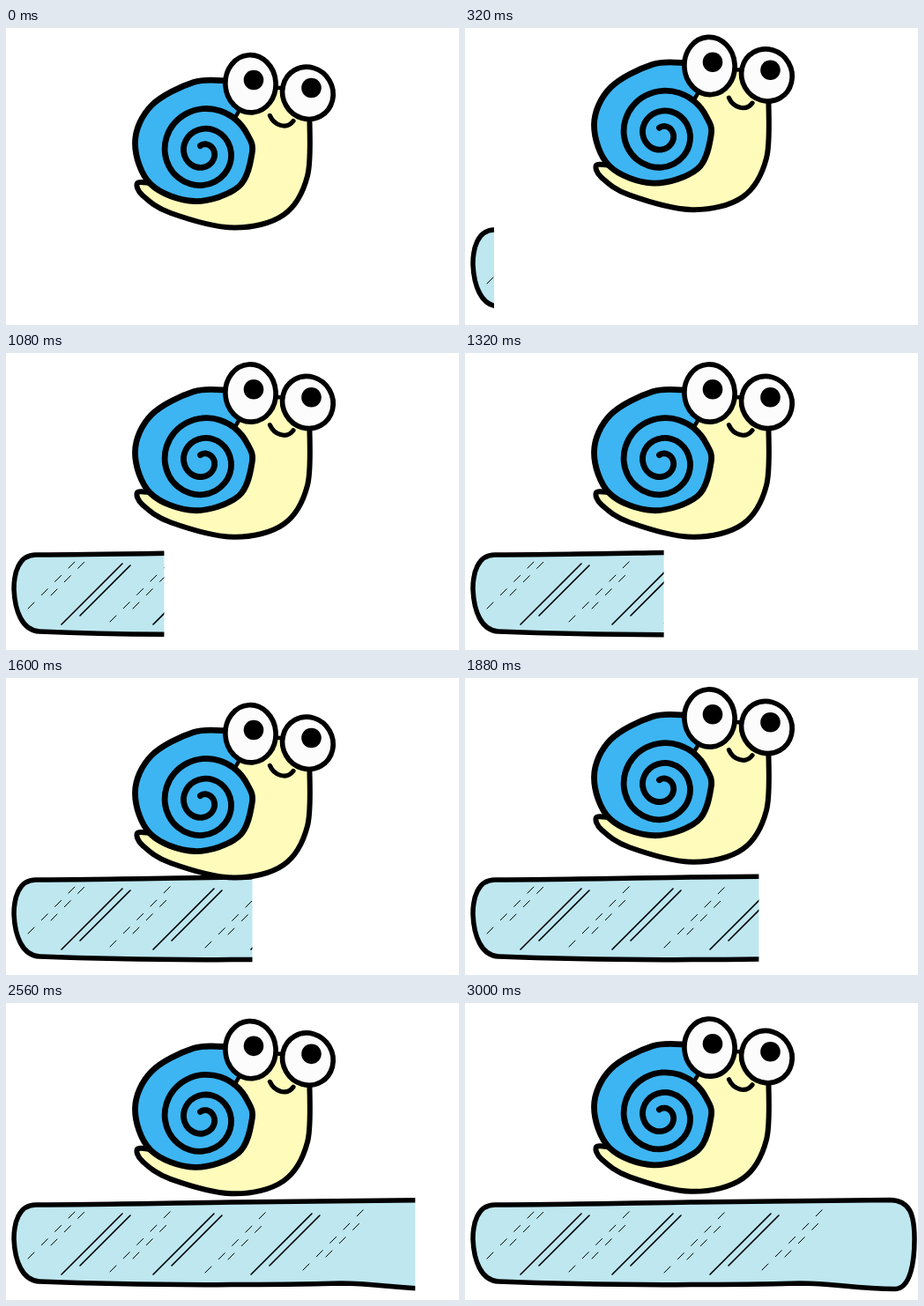
An HTML page for the animation above (3.04 s loop, 514 by 337 pixels).

```html
<!DOCTYPE html>
<html lang="en">
<head>
<meta charset="utf-8">
<title>Bouncing snail</title>
<style>
  html, body { margin: 0; width: 100%; height: 100%; overflow: hidden; background: #fff; }
  svg { display: block; width: 514px; height: 337px; }
  .line { fill: none; stroke: #000; stroke-linecap: round; stroke-linejoin: round; }
</style>
</head>
<body>
<svg viewBox="0 0 514 337">
  <clipPath id="wipe"><rect id="window" width="0" height="337"/></clipPath>
  <g id="bar" clip-path="url(#wipe)"></g>
  <g id="snail"></g>
</svg>
<script>
const LOOP = 3040, STEP = 40;
const BOUNCE = 800, HEIGHT = 25.4;
const WIPE_START = -28.5, WIPE_SPEED = 0.1925;

const bar = document.getElementById('bar');
const snail = document.getElementById('snail');
const wipe = document.getElementById('window');

function add(parent, tag, attrs) {
  const el = document.createElementNS('http://www.w3.org/2000/svg', tag);
  for (const key in attrs) el.setAttribute(key, attrs[key]);
  parent.append(el);
}

const fill = (parent, d, color) => add(parent, 'path', { d, fill: color });
const line = (parent, d, width) => add(parent, 'path', { d, class: 'line', 'stroke-width': width });

// Smooth curve through a few points.
function curve(pts) {
  const at = i => pts[Math.max(0, Math.min(pts.length - 1, i))];
  let d = 'M' + pts[0];
  for (let i = 0; i < pts.length - 1; i++) {
    const [a, b, c, e] = [at(i - 1), at(i), at(i + 1), at(i + 2)];
    const c1 = b.map((v, k) => v + (c[k] - a[k]) / 6);
    const c2 = c.map((v, k) => v - (e[k] - b[k]) / 6);
    d += `C${c1} ${c2} ${c}`;
  }
  return d;
}

// Inward spiral, measured in quarter turns from the right.
function spiral(cx, cy, quarters) {
  const pts = [];
  for (let q = 0; q <= quarters; q += 0.25) {
    const r = 55.8 - 6.6 * q + 0.155 * q * q;
    const angle = q * Math.PI / 2;
    pts.push([cx + r * Math.cos(angle), cy - r * Math.sin(angle)]);
  }
  return pts;
}

function drawBar() {
  const edge = 'M34 229C14 229 9 250 9 268C10 292 18 315 38 316' +
    'C160 321 300 320 380 318C420 318 440 324 488 324.5' +
    'C506 324 510 292 510 268C510 240 505 224 482 223.5' +
    'C400 224 330 225 260 226S100 229 34 229Z';
  fill(bar, edge, '#bee7f0');
  line(bar, edge, 5.5);

  const slant = (x, y, run) => `M${x} ${y}l${run} ${-run}`;
  let dashes = '', glints = '';
  for (const [x, y, count] of [[25, 290, 4], [118, 305, 5], [226, 306, 5], [337, 303, 5]]) {
    for (let i = 0; i < count; i++) dashes += slant(x + 15.3 * i, y - 15.3 * i, 7);
    for (let i = 0; i < 3; i++) dashes += slant(x + 26 + 15.3 * i, y - 15 - 15.3 * i, 7);
  }
  for (const x of [63, 167, 278]) glints += slant(x, 308, 69) + slant(x + 21, 298, 57);
  line(bar, dashes, 1);
  line(bar, glints, 1.6);
}

function drawEye(x, y, rx, ry, tilt, px, py) {
  add(snail, 'ellipse', {
    cx: x, cy: y, rx, ry, transform: `rotate(${tilt} ${x} ${y})`,
    fill: '#fcfcfc', stroke: '#000', 'stroke-width': 5.7
  });
  add(snail, 'circle', { cx: px, cy: py, r: 11.3 });
}

function drawSnail() {
  const body = [
    [163, 176], [149, 176], [155, 190], [187, 210],
    [258, 226.5], [315, 212], [342, 168], [344.5, 100]
  ];
  const shell = [
    [252, 60], [213, 61.5], [165, 88], [146.5, 130], [164, 177], [214, 196.5], [264, 180]
  ];
  const coil = spiral(223.5, 141, 9.25);

  fill(snail, curve(body) + 'L330 72L308 69L270 85L200 150Z', '#fffcbb');
  line(snail, curve(body), 6);
  fill(snail, curve([...shell, ...coil.slice(0, 3)]) + 'L268 90Z', '#3db5f2');
  line(snail, curve([...shell, ...coil]), 6.8);
  line(snail, 'M265 93L261 100', 4.5);
  line(snail, 'M304 68Q309 67 315 69', 4.5);
  line(snail, 'M299.5 99.5C304 110 318 116 326 105.5', 5.2);
  drawEye(277.5, 63.3, 28.6, 32.6, -4, 281, 59);
  drawEye(342.4, 73.8, 28.4, 30, -30, 346.5, 68);
}

function frame(now) {
  const t = Math.floor(now % LOOP / STEP) * STEP;
  const phase = t % BOUNCE / BOUNCE;
  const lift = HEIGHT * (1 - Math.abs(2 * phase - 1));
  snail.setAttribute('transform', `translate(0 ${-lift})`);
  wipe.setAttribute('width', Math.max(0, WIPE_START + WIPE_SPEED * t));
  requestAnimationFrame(frame);
}

drawBar();
drawSnail();
frame(0);
</script>
</body>
</html>
```
